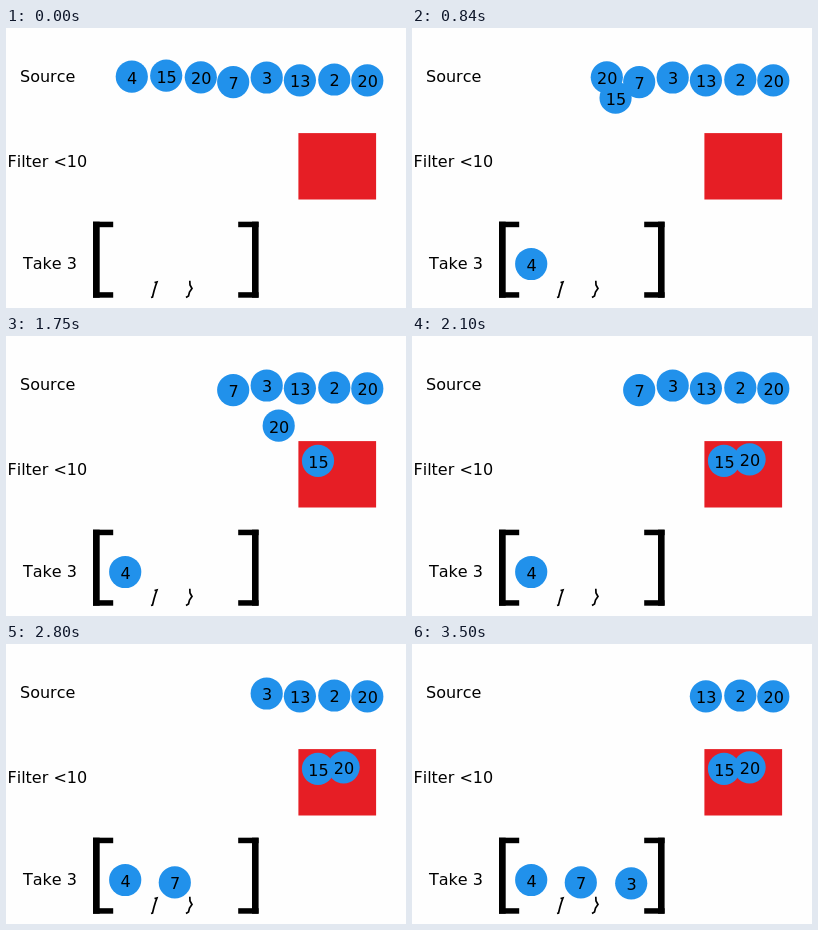
These frames come from a looping animation (400 px wide and 280 px high, 4340 ms). An HTML page with a canvas:

```html
<!DOCTYPE html>
<html lang="en">
<head>
<meta charset="utf-8">
<title>Filter and take</title>
<style>
html, body { margin: 0; width: 100%; height: 100%; overflow: hidden; background: #fefefe; }
canvas { display: block; }
</style>
</head>
<body>
<canvas id="stage" width="400" height="280"></canvas>
<script>
const ctx = document.getElementById('stage').getContext('2d');
const LOOP = 4340;
const TICK = 70;
const RADIUS = 16.1;

// Start and end of each move are counted in ticks.
const balls = [
  { label: '13', from: [293.9, 52.3] },
  { label: '2', from: [328.3, 51.5] },
  { label: '20', from: [361.3, 52.4] },
  { label: '4', from: [125.8, 48.6], to: [119.2, 236], start: 0, end: 10 },
  { label: '15', from: [160.2, 47.6], to: [312, 124.8], start: 10, end: 17 },
  { label: '20', from: [194.8, 49.3], to: [337.6, 123.3], start: 19, end: 30 },
  { label: '7', from: [227.2, 54.1], to: [168.8, 238.4], start: 30, end: 40 },
  { label: '3', from: [260.7, 49.5], to: [219.2, 239.3], start: 40, end: 50 }
];

function write(text, x, y, align) {
  ctx.font = '16px "DejaVu Sans", Verdana, sans-serif';
  ctx.fontKerning = 'none';
  ctx.textAlign = align;
  ctx.fillStyle = '#000';
  ctx.fillText(text, x, y);
}

function stroke(points) {
  ctx.beginPath();
  points.forEach(([x, y]) => ctx.lineTo(x, y));
  ctx.stroke();
}

function drawScene() {
  ctx.fillStyle = '#fefefe';
  ctx.fillRect(0, 0, 400, 280);
  write('Source', 14, 54, 'left');
  write('Filter <10', 1.5, 139, 'left');
  write('Take 3', 17, 241, 'left');

  ctx.fillStyle = '#e61e25';
  ctx.fillRect(292.4, 105.1, 77.7, 66.4);

  ctx.fillStyle = '#000';
  ctx.fillRect(87, 193.7, 6.7, 76);
  ctx.fillRect(246, 193.7, 6.6, 76);
  for (const y of [193.7, 264.2]) {
    ctx.fillRect(87, y, 20.2, 5.5);
    ctx.fillRect(232.2, y, 20.4, 5.5);
  }

  ctx.strokeStyle = '#000';
  ctx.lineWidth = 1.7;
  stroke([[148.5, 254.5], [151, 254], [149.5, 258], [148, 263], [146.5, 269], [145, 269.5]]);
  stroke([[183.8, 252.8], [184, 257], [186, 260.5], [183.5, 264], [182.5, 268], [180, 269.5]]);
}

function drawBall({ label, from, to = from, start = 0, end = 1 }, tick) {
  const p = Math.min(1, Math.max(0, (tick - start) / (end - start)));
  const x = from[0] + (to[0] - from[0]) * p;
  const y = from[1] + (to[1] - from[1]) * p;
  ctx.fillStyle = '#2191eb';
  ctx.beginPath();
  ctx.arc(x, y, RADIUS, 0, Math.PI * 2);
  ctx.fill();
  write(label, x + 0.4, y + 6.9, 'center');
}

let origin;
function frame(now) {
  origin ??= now;
  const tick = Math.floor(((now - origin) % LOOP) / TICK);
  drawScene();
  balls.forEach(ball => drawBall(ball, tick));
  requestAnimationFrame(frame);
}
requestAnimationFrame(frame);
</script>
</body>
</html>
```
